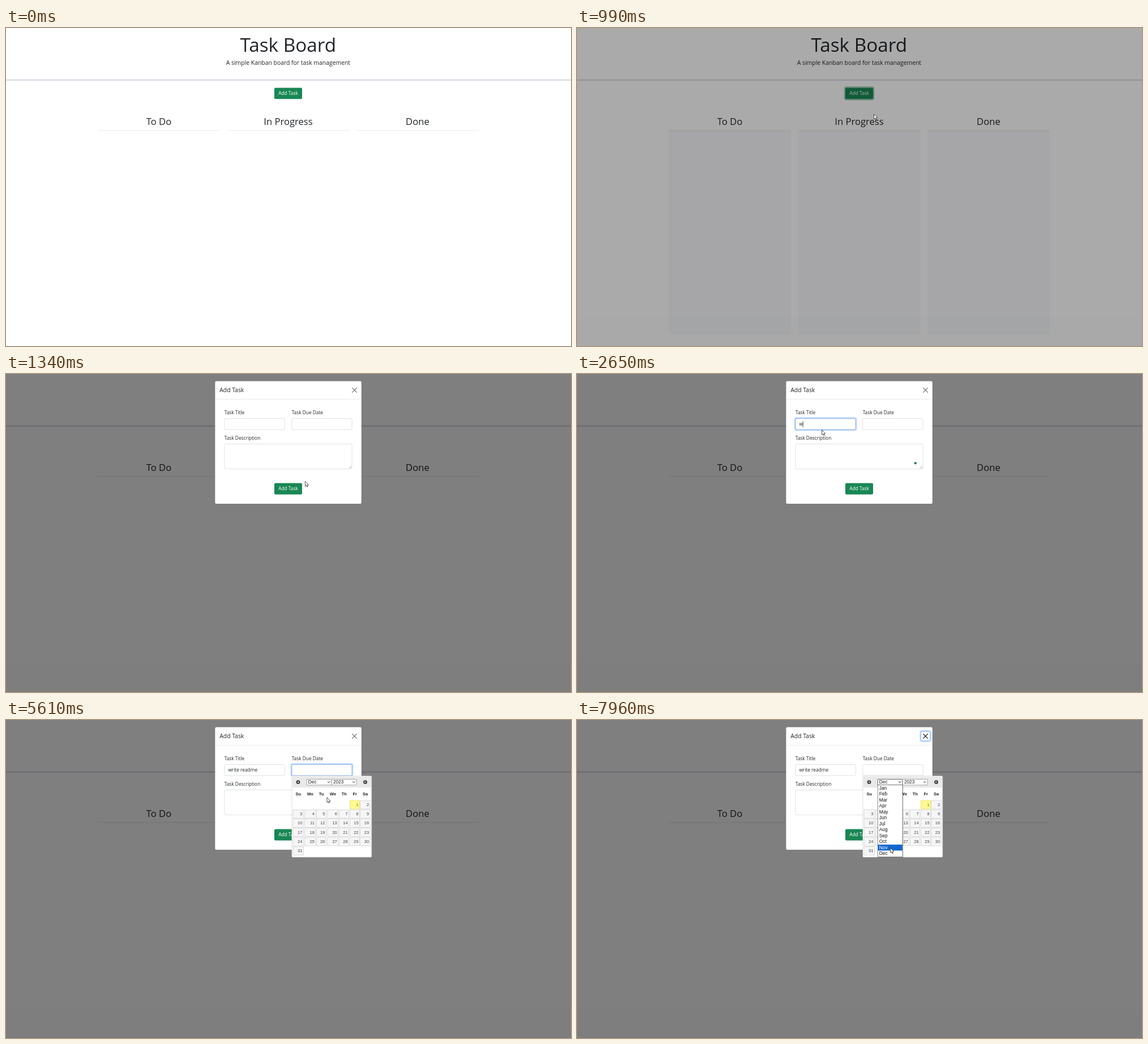
An HTML page for the animation above (8000 ms loop, 998x561 px).

```html
<!DOCTYPE html>
<html lang="en">
<head>
<meta charset="utf-8">
<title>Task Board</title>
<style>
  html, body { margin: 0; width: 100%; height: 100%; overflow: hidden; background: #fff; }
  svg { display: block; width: 998px; height: 561px; }
  text { font-family: "Open Sans", sans-serif; font-size: 8.32px; fill: #212529; white-space: pre; }
  .arial text { font-family: "Liberation Sans", Arial, sans-serif; }
  .field { fill: #fff; stroke: #ced4da; stroke-width: .7; }
  .ring { fill: none; stroke: #0d6efd; stroke-opacity: .25; stroke-width: 2.1; }
  .edge { fill: none; stroke: #86b7fe; stroke-width: .8; }
  .select { fill: #fff; stroke: #767676; stroke-width: .6; }
  .caret { fill: #111; }
</style>
</head>
<body>
<svg id="stage" viewBox="0 0 998 561" xmlns="http://www.w3.org/2000/svg"></svg>
<script>
const LOOP = 8000, STEP = 200 / 3, LAG = 20;
const ROW_TOP = 114.6, ROW = 10.52;

const text = (x, y, s, size = 8.32, extra = '') =>
  `<text x="${x}" y="${y}" style="font-size:${size}px" ${extra}>${s}</text>`;
const mid = (x, y, s, size, extra = '') => text(x, y, s, size, 'text-anchor="middle" ' + extra);
const rect = (x, y, w, h, extra = '') =>
  `<rect x="${x}" y="${y}" width="${w}" height="${h}" ${extra}/>`;
const group = (id, body, extra = '') => `<g id="${id}" ${extra}>${body}</g>`;
const focusRing = (id, x, y, w, h) => group(id,
  rect(x, y, w, h, 'class="edge" rx="2"') +
  rect(x - 1.2, y - 1.2, w + 2.4, h + 2.4, 'class="ring" rx="3"'));
const addButton = (id, y) =>
  rect(474, y, 49, 19.8, `id="${id}" rx="2" fill="#198754"`) +
  mid(498.5, y + 12.8, 'Add Task', 8.32, 'fill="#fff" class="light"').replace('style="', 'style="fill:#fff;');

function board() {
  const columns = [['To Do', 162.3], ['In Progress', 390.8], ['Done', 619.2]];
  return rect(0, 90.5, 998, 2.6, 'fill="#dddde8"') +
    mid(498.3, 42, 'Task Board', 33.27) +
    mid(498.4, 65.3, 'A simple Kanban board for task management', 10.4) +
    group('columns', columns.map(([, x]) =>
      rect(x, 150, 215.8, 391, 'rx="2" fill="#f9fafb"') +
      rect(x, 150, 215.8, 31, 'rx="2" fill="#fff"') + 
      rect(x, 181, 215.8, 358, 'fill="#f8f9fb"')).join('')) +
    columns.map(([name, x]) =>
      rect(x, 180.4, 215.8, .9, 'fill="#000" opacity=".1"') +
      mid(x + 107.7, 170.9, name, 16.63)).join('') +
    rect(472.9, 104.4, 51.2, 22, 'id="pageRing" rx="3" fill="none" stroke="#3c996e" stroke-opacity=".5" stroke-width="2.1"') +
    addButton('pageButton', 105.4);
}

function modal() {
  return rect(369.2, 12.5, 258.7, 216.5, 'rx="2.5" fill="#fff" stroke="#000" stroke-opacity=".2" stroke-width=".5"') +
    text(377.2, 32, 'Add Task', 10.4) +
    rect(369.4, 44.2, 258.3, .7, 'fill="#dee2e6"') +
    '<path id="close" d="M611.6 24.6l7.8 7.8m0-7.8l-7.8 7.8" stroke="#000" stroke-width="1.1" stroke-linecap="round"/>' +
    focusRing('closeFocus', 607.5, 20.3, 16.3, 16.3) +
    text(385.8, 71.2, 'Task Title') + text(504.7, 71.2, 'Task Due Date') +
    text(385.8, 115.8, 'Task Description') +
    rect(385.9, 78.6, 106.3, 19.4, 'rx="2" class="field"') +
    rect(504.8, 78.6, 106.3, 19.4, 'rx="2" class="field"') +
    rect(385.9, 123.4, 225.2, 44, 'rx="2" class="field"') +
    '<path d="M606 166.2l4-4m-1.6 4l1.6-1.6" stroke="#777" stroke-width=".6"/>' +
    focusRing('titleFocus', 385.9, 78.6, 106.3, 19.4) +
    focusRing('dateFocus', 504.8, 78.6, 106.3, 19.4) +
    text(392.4, 91.4, '', 8.32, 'id="typed"') +
    rect(392, 83, .7, 11, 'id="titleCaret" class="caret"') +
    rect(511.2, 83, .7, 11, 'id="dateCaret" class="caret"') +
    '<circle id="dot" cx="597.8" cy="157.3" r="2.1" fill="#15795c"/>' +
    addButton('modalButton', 192.6);
}

function calendar() {
  const lefts = [507, 527.5, 548.4, 567.8, 588.6, 607.4, 625.8];
  const widths = [18.4, 19.4, 17, 19, 17, 17.2, 17.4];
  const arrow = (x, dir) => `<circle cx="${x}" cy="109.6" r="3.4" fill="#3c3c3c"/>
    <path d="M${x - dir} 107.8v3.6l${dir * 2.2}-1.8z" fill="#fff"/>`;
  const select = (id, x, label) =>
    rect(x, 104.5, 43.8, 10.2, `id="${id}" class="select" rx=".6"`) + text(x + 2.6, 112.4, label, 8.3) +
    `<path d="M${x + 37} 108.5l2 2 2-2" fill="none" stroke="#111" stroke-width="1"/>`;
  let out = rect(504.9, 98.7, 140.9, 143.4, 'rx="1.5" fill="#fff" stroke="#c5c5c5" stroke-width=".6"') +
    rect(505.8, 99.8, 139.1, 19.4, 'rx="1.5" fill="#e9e9e9"') +
    arrow(516, -1) + arrow(634.5, 1) + select('month', 531.2, 'Dec') + select('year', 575.3, '2023');
  'Su Mo Tu We Th Fr Sa'.split(' ').forEach((name, i) => {
    out += mid(lefts[i] + widths[i] / 2 + .2, 132.6, name, 7.5, 'font-weight="700"');
  });
  for (let day = 1; day <= 31; day++) {
    const cell = day + 4, col = cell % 7, y = 142 + Math.floor(cell / 7) * 16.26;
    const [fill, stroke, ink] = day === 1 ? ['#fffa90', '#dad55e', '#777620'] : ['#f6f6f6', '#c5c5c5', '#454545'];
    out += rect(lefts[col], y, widths[col], 14.9, `fill="${fill}" stroke="${stroke}" stroke-width=".6"`) +
      text(lefts[col] + widths[col] - 2, y + 9.9, day, 7.5, 'text-anchor="end"').replace('style="', `style="fill:${ink};`);
  }
  return out;
}

function dropdown() {
  const months = 'Jan Feb Mar Apr May Jun Jul Aug Sep Oct Nov Dec'.split(' ');
  return rect(532.2, 116, 44.2, 127, 'fill="#000" opacity=".18"') +
    rect(531.2, 114.6, 43.8, 127, 'fill="#fff" stroke="#555" stroke-width=".7"') +
    rect(531.5, 0, 43.2, ROW, 'id="highlight" fill="#1368ce"') +
    months.map((m, i) => text(533.8, (ROW_TOP + i * ROW + 8.1).toFixed(2), m, 8.3, 'class="month"')).join('');
}

const stage = document.getElementById('stage');
stage.innerHTML = rect(0, 0, 998, 561, 'fill="#fff"') + board() +
  group('backdrop', rect(0, 0, 998, 561) + rect(0, 560, 998, 1, 'fill-opacity=".4"')) +
  group('modal', modal()) +
  group('calendar', calendar(), 'class="arial"') +
  group('dropdown', dropdown(), 'class="arial"') +
  group('cursor',
    '<path id="pointer" d="M0 0V8.9L2.1 7.1 3.4 10.1 4.7 9.5 3.5 6.6H6.1Z" fill="#fff" stroke="#111" stroke-width=".7"/>' +
    '<path id="beam" d="M-1.6-4.4H1.6M-1.6 4.4H1.6M0-4.4V4.4" stroke="#333" stroke-width=".7"/>');

const el = {};
stage.querySelectorAll('[id]').forEach(n => el[n.id] = n);
const monthLabels = [...stage.querySelectorAll('.month')];

// Pointer path: time, x, y
const path = [
  [47, 896, 372], [250, 800, 300], [450, 640, 185], [620, 545, 132], [780, 516, 118], [915, 515, 118],
  [980, 524.5, 152], [1115, 529, 186], [1313, 528.5, 189.3], [1450, 526, 180], [1715, 489, 137],
  [1980, 434, 91], [2120, 433, 89], [2250, 432.5, 98.5], [5380, 432.5, 98.5], [5580, 567, 136.5],
  [5790, 622, 150.5], [6050, 622, 150.5], [6400, 575, 125], [6830, 513, 106], [7040, 568, 111.5],
  [7250, 566, 111.5], [7500, 560, 150], [7750, 555, 210], [7930, 553.5, 227], [8000, 553.5, 227]
];
const typing = [2650, 2780, 3110, 3180, 3380, 3450, 3980, 4050, 4250, 4450, 4650, 4730];
const phrase = 'write readme';

const clamp = v => Math.min(1, Math.max(0, v));
const show = (node, on) => { node.style.display = on ? '' : 'none'; };
const within = (x, y, l, t, r, b) => x > l && x < r && y > t && y < b;

function pointerAt(t) {
  const i = Math.max(1, path.findIndex(p => p[0] >= t));
  const [t0, x0, y0] = path[i - 1], [t1, x1, y1] = path[i];
  const k = clamp((t - t0) / (t1 - t0));
  return [x0 + (x1 - x0) * k, y0 + (y1 - y0) * k];
}

function render(t) {
  const s = Math.max(0, Math.floor((t + LAG) / STEP) * STEP - LAG);
  const [x, y] = pointerAt(s);
  const calendarOpen = t >= 5060, menuOpen = t >= 7260;

  show(el.columns, t >= 920 && t < 1060);
  show(el.pageRing, t >= 860);
  el.pageButton.setAttribute('fill', t < 1060 && within(x, y, 474, 105, 523, 125) ? '#157347' : '#198754');
  el.backdrop.style.opacity = clamp((s - 880) / 150) * .5;

  const slide = clamp((s - 1027) / 280);
  el.modal.style.opacity = clamp((s - 1027) / 150);
  el.modal.setAttribute('transform', `translate(0 ${-26 * (1 - slide) ** 2})`);
  show(el.dot, t >= 1610);

  const titleActive = t >= 2160 && t < 5060;
  show(el.titleFocus, titleActive);
  show(el.titleCaret, titleActive);
  el.typed.textContent = phrase.slice(0, typing.filter(k => k <= t).length);
  const end = el.typed.textContent ? el.typed.getComputedTextLength() : 0;
  el.titleCaret.setAttribute('x', 392.3 + end);

  show(el.dateFocus, calendarOpen && !menuOpen);
  show(el.dateCaret, calendarOpen && (t < 5590 || (t >= 6120 && t < 6650)));
  show(el.calendar, calendarOpen);
  el.calendar.style.opacity = clamp((s - 5000) / 200);

  show(el.dropdown, menuOpen);
  show(el.closeFocus, menuOpen);
  el.close.style.opacity = menuOpen ? 1 : .6;
  el.month.style.stroke = menuOpen ? '#111' : '';
  const row = Math.floor((y - ROW_TOP) / ROW);
  const active = row >= 0 && row < 12 ? row : 11;
  el.highlight.setAttribute('y', ROW_TOP + active * ROW);
  monthLabels.forEach((n, i) => { n.style.fill = i === active ? '#fff' : '#111'; });

  const overText = t > 1200 && !calendarOpen &&
    (within(x, y, 386, 78, 492, 98) || within(x, y, 386, 123, 611, 167));
  show(el.cursor, t >= 70);
  show(el.pointer, !overText);
  show(el.beam, overText);
  el.cursor.setAttribute('transform', `translate(${x} ${y})`);
}

const start = performance.now();
function tick() {
  render((performance.now() - start) % LOOP);
  requestAnimationFrame(tick);
}
tick();
</script>
</body>
</html>
```
